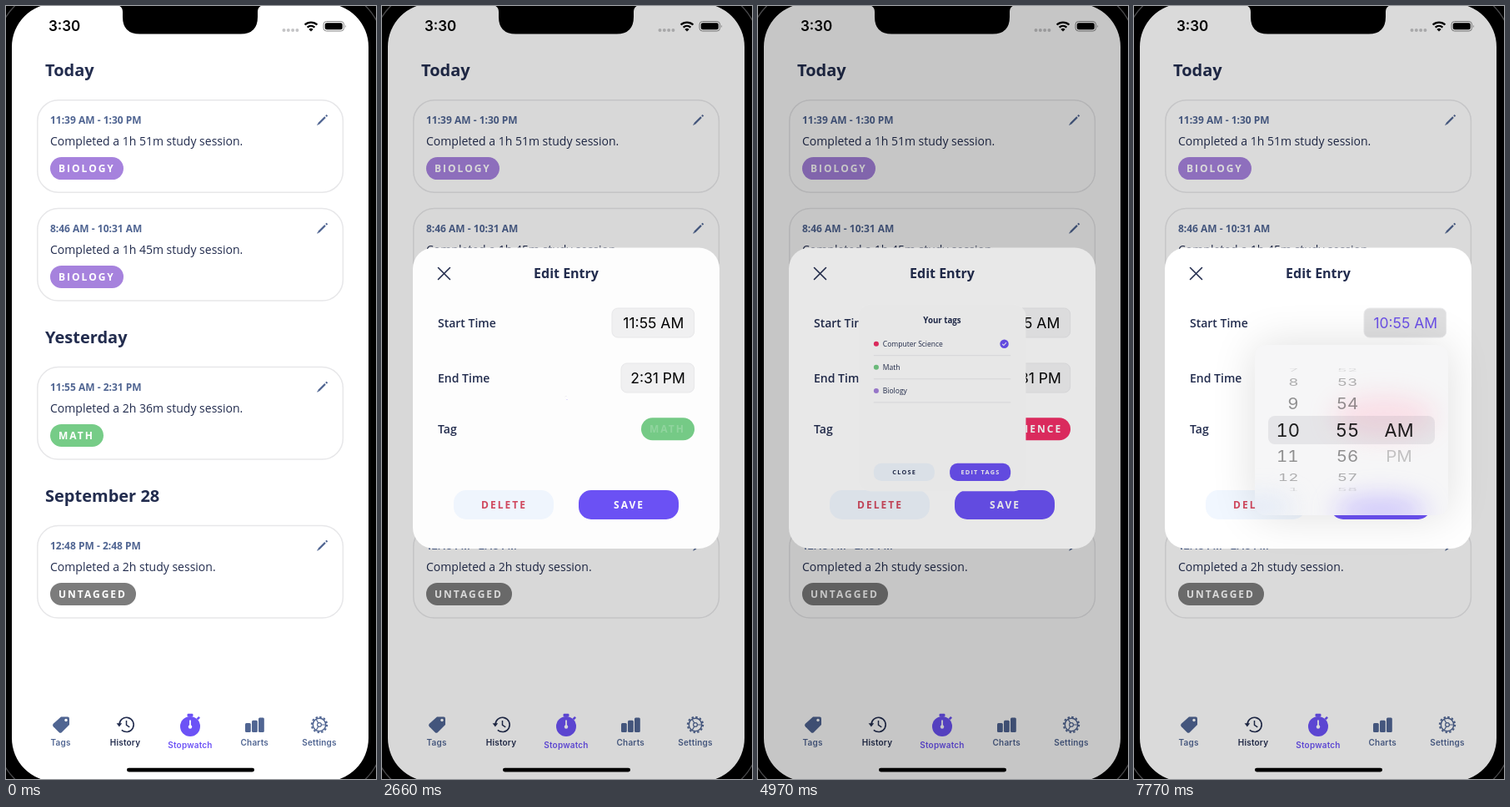
Animation, 444 px wide and 926 px high, one loop 8000 ms. Source, as an HTML page:

```html
<!DOCTYPE html>
<html lang="en">
<head>
<meta charset="utf-8">
<title>Study history</title>
<style>
  html, body { margin: 0; width: 100%; height: 100%; overflow: hidden; background: #000; }
  svg { display: block; width: 100%; height: 100%; }
  text { font-family: "Open Sans", sans-serif; fill: #222c4e; white-space: pre; }
  .h { font-weight: 700; font-size: 20px; }
  .title { font-weight: 700; font-size: 16px; text-anchor: middle; }
  .time { font-weight: 700; font-size: 12px; fill: #506592; }
  .body { font-size: 14px; }
  .label { font-weight: 600; font-size: 14px; }
  .caps { font-weight: 700; font-size: 12px; letter-spacing: 2px; }
  .mid { text-anchor: middle; }
  .sys { font-family: Inter, "Liberation Sans", sans-serif; fill: #000; }
  .clock { font-size: 17px; font-weight: 600; }
  .value { font-size: 17.5px; text-anchor: middle; }
  .tab { font-size: 10px; font-weight: 600; letter-spacing: .2px; text-anchor: middle; }
  .wheel { font-feature-settings: "tnum"; }
</style>
</head>
<body>
<svg id="stage" viewBox="0 0 444 926" preserveAspectRatio="none"></svg>
<script>
const LOOP = 8000;
const INK = '#222c4e', SLATE = '#506592', VIOLET = '#6c52f6';
const PURPLE = '#a682dd', GREEN = '#76cc87', RED = '#f02e66', GRAY = '#7c7c7c';
const DIM = 0.145;

const rect = (x, y, w, h, r, fill, extra = '') =>
  `<rect x="${x}" y="${y}" width="${w}" height="${h}" rx="${r}" fill="${fill}" ${extra}/>`;
const text = (x, y, cls, s, extra = '') =>
  `<text x="${x}" y="${y}" class="${cls}" ${extra}>${s}</text>`;
const dot = (x, y, r, fill) => `<circle cx="${x}" cy="${y}" r="${r}" fill="${fill}"/>`;
const line = (d, color, width, extra = '') =>
  `<path d="${d}" fill="none" stroke="${color}" stroke-width="${width}" ${extra}/>`;
const dimmer = id => rect(0, 0, 444, 926, 0, '#000', `id="${id}" opacity="0"`);

const pill = (x, y, w, name, color) =>
  rect(x, y, w, 27, 13.5, color) + text(x + 10, y + 18, 'caps', name, 'style="fill:#fff"');
const button = (x, y, name, fill, color) =>
  rect(x, y, 120, 35, 15, fill) +
  text(x + 60.5, y + 22, 'caps mid', name, `style="fill:${color}"`);

function card(y, time, length, tag, w, color) {
  return rect(37.8, y, 366.6, 110.4, 25, 'none', 'stroke="#e7e7e9" stroke-width="1.5"') +
    text(53, y + 28, 'time', time) +
    text(53, y + 54, 'body', `Completed a ${length} study session.`) +
    pill(53, y + 68.3, w, tag, color) +
    `<g transform="translate(380 ${y + 23.3})">` +
    line('M-5 5L3 -3', SLATE, 2.2) + line('M4 -4L5.4 -5.4', SLATE, 2.2) +
    line('M-6.5 6.5L-4.5 4.5', SLATE, 1.1) + '</g>';
}

function tabs() {
  const tag = `<path d="M66 851.5h8a2 2 0 0 1 2 2v7.5l-9 9a2.5 2.5 0 0 1-3.5 0l-6.7-6.7a2.5 2.5 0 0 1 0-3.5z" fill="${SLATE}"/>` +
    dot(72, 855.5, 1.7, '#fff');
  const history = line('M136 861a8.6 8.6 0 1 1 2.8 6.3', INK, 1.6) +
    `<path d="M132.6 859.2h6.6l-3.3 4.2z" fill="${INK}"/>` +
    line('M144.5 856v5.4l3.8 2.4', INK, 1.5);
  const watch = dot(221, 863, 12, VIOLET) + rect(217.5, 847.8, 7, 3.4, 1.2, VIOLET) +
    line('M229.5 854.5l2.6-2.6', VIOLET, 2.6) + line('M221 855.5v8', '#fff', 1.8) + dot(221, 863.5, 2.2, '#fff');
  const bars = [0, 1, 2].map(i =>
    rect(287 + i * 8, 859 - i * 3.3, 6.8, 11 + i * 3.3, 1.5, SLATE)).join('');
  const gear = '<g transform="translate(376 861)">' +
    `<circle r="9.2" fill="none" stroke="${SLATE}" stroke-width="2" stroke-dasharray="2.4 2.417"/>` +
    `<circle r="7.7" fill="none" stroke="${SLATE}" stroke-width="1.5"/>` +
    `<circle r="2.4" fill="none" stroke="${SLATE}" stroke-width="1.2"/>` +
    line('M2.4 0H7.5M-1.2 -2.1L-3.8 -6.5M-1.2 2.1L-3.8 6.5', SLATE, 1.2) + '</g>';
  const names = [['Tags', 65.6, 886, SLATE], ['History', 143, 886, INK], ['Stopwatch', 221, 888.5, VIOLET],
    ['Charts', 298.3, 886, SLATE], ['Settings', 376, 886, SLATE]];
  return tag + history + watch + bars + gear +
    names.map(([s, x, y, c]) => text(x, y, 'sys tab', s, `style="fill:${c}"`)).join('');
}

function statusBar() {
  const dots = [333.5, 338.8, 344.1, 349.4].map(x => dot(x, 29, 2, '#c4c4c6')).join('');
  const wifi = line('M358.6 22.5a10.8 10.8 0 0 1 14.8 0M361.6 25.6a6.6 6.6 0 0 1 8.8 0', '#000', 2.3) +
    '<path d="M366 30.6l-2.6-2.7a3.8 3.8 0 0 1 5.2 0z"/>';
  const battery = rect(381, 18.5, 24.5, 11.5, 3.6, 'none', 'stroke="#888" stroke-width="1"') +
    rect(382.7, 20.2, 21.1, 8.1, 2.2, '#000') + '<path d="M407 22.4q1.8 1.8 0 3.8z" fill="#888"/>';
  return text(51, 30.2, 'sys clock', '3:30') + dots + wifi + battery;
}

function history() {
  return rect(0, 0, 444, 926, 0, '#fff') + statusBar() +
    text(47, 84, 'h', 'Today') +
    card(112.8, '11:39 AM - 1:30 PM', '1h 51m', 'BIOLOGY', 88, PURPLE) +
    card(242.6, '8:46 AM - 10:31 AM', '1h 45m', 'BIOLOGY', 88, PURPLE) +
    text(47, 404, 'h', 'Yesterday') +
    card(432.6, '11:55 AM - 2:31 PM', '2h 36m', 'MATH', 64, GREEN) +
    text(47, 594, 'h', 'September 28') +
    card(622.6, '12:48 PM - 2:48 PM', '2h', 'UNTAGGED', 103, GRAY) +
    tabs() + rect(145, 912.8, 153, 4.6, 2.3, '#000');
}

const edge = 'stroke="#e9e9eb" stroke-width="1"';
const editModal = () =>
  rect(37, 289.5, 368, 360.5, 25, '#fff') +
  line('M67.5 313.5l14 14m0-14l-14 14', INK, 1.6, 'stroke-linecap="round"') +
  text(221, 326.3, 'title', 'Edit Entry') +
  text(67, 385, 'label', 'Start Time') + text(67, 451, 'label', 'End Time') + text(67, 512, 'label', 'Tag') +
  rect(276, 362, 98.6, 35, 7, '#f2f2f3', 'id="startBox" ' + edge) +
  text(325.8, 386, 'sys value', '', 'id="start"') +
  rect(287, 428, 87.6, 35, 7, '#f2f2f3', edge) + text(331, 452, 'sys value', '2:31 PM') +
  `<g id="mathPill">${rect(311, 493.3, 64, 27, 13.5, GREEN)}` +
  text(321, 511.3, 'caps', 'MATH', 'id="mathText" style="fill:#fff"') + '</g>' +
  `<g id="csPill">${pill(204.5, 493.3, 170.5, 'COMPUTER SCIENCE', RED)}</g>` +
  button(86, 580, 'DELETE', '#f1f7ff', '#d2495f') + button(236, 580, 'SAVE', VIOLET, '#fff');

const tagsModal = () =>
  rect(56, 286, 330, 367, 23, '#fff') + text(221, 322.7, 'title', 'Your tags') +
  [['Computer Science', RED], ['Math', GREEN], ['Biology', PURPLE]].map(([name, color], i) => {
    const y = 363 + 46.2 * i;
    return dot(91, y, 5, color) + text(104, y + 5, 'body', name) +
      line(`M86 ${y + 23}H356`, '#e4e4e7', 1.2);
  }).join('') +
  `<g id="check">${dot(343.5, 363, 8.6, VIOLET)}` +
  line('M339.6 363.2l2.8 2.8 5-5.6', '#fff', 1.7) + '</g>' +
  button(86, 598, 'CLOSE', '#f1f7ff', INK) + button(236, 598, 'EDIT TAGS', VIOLET, '#fff') +
  rect(56, 286, 330, 367, 23, '#000', 'id="tagsTint" opacity="0"');

const glow = (x, y, rx, ry, color, o) =>
  `<ellipse cx="${x}" cy="${y}" rx="${rx}" ry="${ry}" fill="${color}" opacity="${o}" filter="url(#soft)"/>`;
const picker = () =>
  rect(145, 406, 232, 204, 13, '#000', 'id="shade" opacity=".13" filter="url(#shadow)"') +
  '<g clip-path="url(#pickerClip)">' + rect(145, 406, 232, 204, 0, '#f6f6f7') +
  glow(300, 492, 62, 26, '#ffb9ce', .38) + glow(296, 604, 56, 17, '#a899ff', .5) +
  glow(150, 600, 45, 14, '#d5e2f7', .6) +
  rect(161, 491, 200, 34, 8, '#787880', 'opacity=".13"') + '<g id="wheels"></g></g>';

// Bezel, notch and screen corners
const bezel = () =>
  `<path fill-rule="evenodd" d="M-2 -2H446V928H-2Z M59 -3H383a52 52 0 0 1 52 52V877a52 52 0 0 1-52 52H59a52 52 0 0 1-52-52V49a52 52 0 0 1 52-52Z"/>` +
  '<path d="M133 -1q7 1 7 8v6q0 20.5 20.5 20.5h121q20.5 0 20.5-20.5v-6q0-7 7-8z"/>' +
  rect(-10, -20, 462, 966, 69, 'none', 'stroke="#48484a" stroke-width="1.4"');

const stage = document.getElementById('stage');
stage.innerHTML = `<defs>
  <filter id="shadow" x="-60%" y="-60%" width="220%" height="220%"><feGaussianBlur stdDeviation="27"/></filter>
  <filter id="soft" x="-100%" y="-200%" width="300%" height="500%"><feGaussianBlur stdDeviation="15"/></filter>
  <clipPath id="pickerClip"><rect id="pickerBox" x="145" y="406" width="232" height="204" rx="13"/></clipPath>
  </defs>` + history() + dimmer('editDim') + `<g id="edit">${editModal()}</g>` +
  dimmer('tagsDim') + `<g id="tags">${tagsModal()}</g><g id="picker">${picker()}</g>` + bezel();

const el = {};
stage.querySelectorAll('[id]').forEach(n => { el[n.id] = n; });
const set = (id, attrs) => { for (const k in attrs) el[id].setAttribute(k, attrs[k]); };
const show = (id, on) => { el[id].style.display = on ? '' : 'none'; };
const clamp = v => Math.max(0, Math.min(1, v));
const span = (t, from, to) => clamp((t - from) / (to - from));
const ease = v => v < .5 ? Math.pow(2 * v, 1.66) / 2 : 1 - Math.pow(2 - 2 * v, 1.66) / 2;
const zoom = (x, y, s) => `translate(${x} ${y}) scale(${s}) translate(${-x} ${-y})`;

// Underdamped spring from 0 to 1 (stiffness 230, damping 22)
function spring(ms) {
  if (ms <= 0) return 0;
  const s = ms / 1000, w = Math.sqrt(230 - 121);
  return 1 - Math.exp(-11 * s) * (Math.cos(w * s) + 11 / w * Math.sin(w * s));
}

// One column of a cylindrical picker wheel
function wheel(x, anchor, pos, label, fade) {
  let out = '';
  for (let n = Math.round(pos) - 3; n <= Math.round(pos) + 3; n++) {
    const d = n - pos, a = d * 25.2 * Math.PI / 180, s = label(n);
    if (!s || Math.cos(a) < .1) continue;
    const near = Math.max(0, 1 - Math.abs(d)), c = Math.cos(a);
    const size = 22 - Math.min(3, 1.5 * Math.abs(d));
    const alpha = near * .87 + (1 - near) * .46 * c * fade;
    const shift = anchor === 'end' ? -1.5 * Math.min(1, Math.abs(d)) : 0;
    out += `<text class="sys wheel" text-anchor="${anchor}" font-size="${size}" opacity="${alpha}" ` +
      `transform="translate(${x + shift} ${508 + 74 * Math.sin(a)}) scale(1 ${c})" y="${size * .364}">${s}</text>`;
  }
  return out;
}
const mod = (n, m) => ((n % m) + m) % m;

function render(t) {
  const editScale = spring(t - 1015);
  show('edit', editScale > 0);
  set('edit', { transform: zoom(221, 470, editScale) });
  set('editDim', { opacity: DIM * span(t, 1015, 1215) });

  const closing = ease(span(t, 4820, 5170));
  const tagScale = spring(t - 2650) * (1 - closing);
  show('tags', tagScale > .001);
  set('tags', { transform: zoom(221, 469.5, tagScale) });
  set('tagsDim', { opacity: DIM * span(t, 2650, 2850) * (1 - closing) });
  set('tagsTint', { opacity: .24 * closing });
  set('check', { transform: `translate(0 ${t < 4130 ? 46.2 : 0})` });
  set('mathText', { opacity: t < 2655 ? 1 : .2 });
  show('mathPill', t < 4130);
  show('csPill', t >= 4130);

  const active = t >= 6230, pressed = t >= 5880 && !active;
  el.start.textContent = t < 7330 ? '11:55 AM' : '10:55 AM';
  el.start.style.fill = active ? '#6a4fe6' : '#000';
  set('start', { opacity: pressed ? 1 - .65 * span(t, 5880, 6090) : 1 });
  set('startBox', { fill: active ? '#dfdfe0' : '#f2f2f3' });

  const w = Math.max(0, t - 6300) * .023;
  const s = .25 + .75 * (1 - (1 + w) * Math.exp(-w));
  show('picker', t > 6300);
  if (t > 6300) {
    const h = 204 - 180 * (1 - s);
    set('picker', { transform: zoom(325, 408, s), opacity: span(t, 6300, 6480) });
    set('pickerBox', { height: h });
    set('shade', { height: h });
    const hour = 11 - ease(span(t, 7030, 7350));
    el.wheels.innerHTML =
      wheel(199, 'end', hour, n => mod(n - 1, 12) + 1, 1) +
      wheel(256, 'middle', 55, n => String(mod(n, 60)).padStart(2, '0'), 1) +
      wheel(318, 'middle', 0, n => ['AM', 'PM'][n], .5);
  }
}

const began = performance.now();
function tick() {
  render((performance.now() - began) % LOOP);
  requestAnimationFrame(tick);
}
tick();
</script>
</body>
</html>
```
